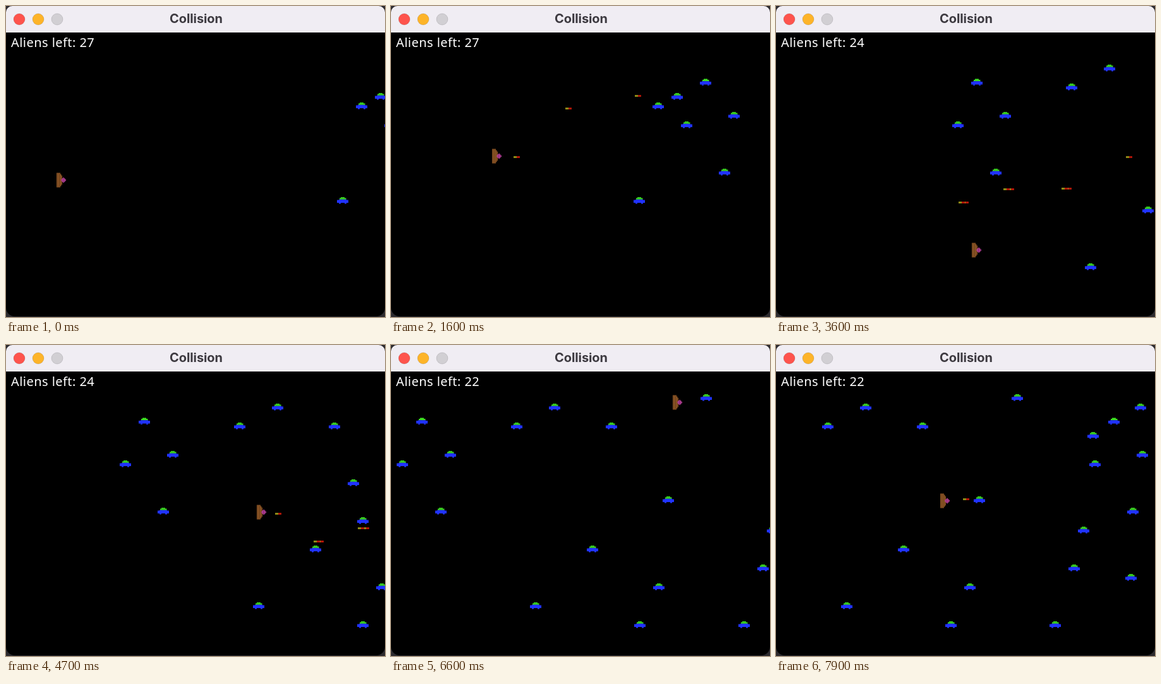
An HTML page with a canvas for the animation above (8 s loop, 600 by 493 pixels).

```html
<!DOCTYPE html>
<html lang="en">
<head>
<meta charset="utf-8">
<title>Collision</title>
<style>
html, body { margin: 0; width: 100%; height: 100%; overflow: hidden; background: #2c2a2e; }
canvas { display: block; }
</style>
</head>
<body>
<canvas id="stage" width="600" height="493"></canvas>
<script>
const LOOP = 8000, STEP = 100, WIDTH = 600, WRAP = 603, PIXEL = 1.5;
const ctx = document.getElementById('stage').getContext('2d');

// Distance the aliens have flown, after a slightly slow start.
const scrollAt = t => 0.0899 * t - Math.min(4, t / 400);

// Course of the ship: [ms, left, middle]
const COURSE = [
  [0, 80, 276], [200, 126, 142], [900, 139, 162], [1500, 162, 239], [1600, 160, 238],
  [2000, 200, 309], [2400, 227, 289], [3000, 244, 290], [3440, 244, 311], [3600, 310, 387],
  [4600, 393, 267], [4700, 397, 265], [4800, 408, 279], [5100, 415, 219], [5500, 413, 221],
  [5900, 418, 197], [6600, 446, 91], [7900, 260, 247]
];
const FIRE_TIMES = [200, 900, 1500, 2000, 2400, 2433, 3000, 3040, 3400, 3433,
  4600, 4800, 5100, 5500, 7800];

// Aliens sit on a coarse grid: [column, row]
const aliens = [
  [35, 15], [37, 5], [39, 4], [40, 7], [42, 2.5], [44, 12], [45, 6], [52, 3],
  [54, 22], [56, 1], [60, 16], [62, 3], [64, 9], [65, 13], [65, 24], [67, 20],
  [68, 10.8], [72, 0], [76, 24], [78, 18], [79, 14], [80, 4], [84, 19], [85, 1]
].map(([col, row]) => ({ x: 7 + 15.02 * col, y: 83 + 15 * row, hit: Infinity }));

function shipAt(t) {
  const i = COURSE.findIndex(k => k[0] > t);
  if (i < 0) return COURSE[COURSE.length - 1].slice(1);
  const [t0, x0, y0] = COURSE[i - 1], [t1, x1, y1] = COURSE[i];
  const p = (t - t0) / (t1 - t0), ease = p * p * (3 - 2 * p);
  return [x0 + (x1 - x0) * ease, y0 + (y1 - y0) * ease];
}

// A shot flies right at twice the alien speed and takes the first alien in its way.
const shots = FIRE_TIMES.map(fired => {
  const [left, y] = shipAt(fired), from = scrollAt(fired);
  const shot = { x: left + 15 - 2 * from, y, fired, hit: Infinity };
  const meet = a => (a.x - 19 - shot.x) / 3;
  const victim = aliens.find(a => a.hit === Infinity && Math.abs(a.y - y) < 8 &&
    meet(a) > from && a.x - meet(a) < WIDTH);
  if (victim) victim.hit = shot.hit = meet(victim);
  return shot;
});

function rect(color, x, y, w, h) {
  ctx.fillStyle = color;
  ctx.fillRect(x, y, w, h);
}

function text(str, x, y, font, color, align, spacing) {
  ctx.font = font;
  ctx.fillStyle = color;
  ctx.textAlign = align;
  ctx.letterSpacing = spacing;
  ctx.fillText(str, x, y);
}

function drawAlien(x, y) {
  x = Math.round(x);
  const green = '#3ee322', blue = '#2033ff';
  const bar = (color, dx, row, w, rows = 1) =>
    rect(color, x + dx, y - 5 + row * PIXEL, w, rows * PIXEL);
  bar(green, -3, 0, 6);
  bar(green, -5, 1, 10.5, 1.5);
  bar(blue, -6, 2.5, 12);
  bar(blue, -9, 3, 18, 3);
  bar(blue, -6, 6, 3);
  bar(blue, 3, 6, 3);
}

function drawShip(x, y) {
  x = Math.round(x);
  for (let dx = 0; dx < 15; dx += PIXEL) {
    const body = dx < 9 ? 23 - 2.8 * Math.max(0, dx - 4.5) : 0;
    const nose = dx > 7 ? 9 - 2 * Math.abs(dx - 10.25) : 0;
    rect('#8b5424', x + dx, y - body / 2, PIXEL, body);
    if (nose > 0) rect('#b03c94', x + dx, y - nose / 2, PIXEL, nose);
  }
}

function drawShot(x, y) {
  x = Math.round(x);
  y = Math.round(y);
  rect('#b01508', x, y - 1, 10, 3);
  rect('#8d8a16', x, y - 1, 5, 3);
}

function drawWindow() {
  rect('#2c2a2e', 0, 0, WIDTH, 493);
  ctx.beginPath();
  ctx.roundRect(0, 0, WIDTH, 492, [10, 10, 14, 14]);
  ctx.clip();
  rect('#000', 0, 42, WIDTH, 451);
  rect('#f0edf3', 0, 0, WIDTH, 42);
  ['#fe544d', '#fdb429', '#d1cfd3'].forEach((color, i) => {
    ctx.fillStyle = color;
    ctx.strokeStyle = 'rgba(0, 0, 0, 0.12)';
    ctx.beginPath();
    ctx.arc(21 + i * 30, 21, 9, 0, Math.PI * 2);
    ctx.fill();
    ctx.stroke();
  });
  text('Collision', 301, 27, '700 20px Inter, sans-serif', '#3d3a40', 'center', '-0.1px');
}

function draw(now) {
  const t = Math.floor(now % LOOP / STEP) * STEP, scroll = scrollAt(t);
  const alive = aliens.filter(a => scroll < a.hit);

  ctx.save();
  drawWindow();
  for (const a of alive) {
    const x = a.x - scroll;
    drawAlien(x < 0 ? x + WRAP : x, a.y);
  }
  for (const s of shots) {
    if (t >= s.fired && scroll < s.hit) drawShot(s.x + 2 * scroll, s.y);
  }
  drawShip(...shipAt(t));
  text('Aliens left: ' + (alive.length + 3), 8, 65,
    '20px "Noto Sans", "Open Sans", sans-serif', '#fff', 'left', '0.45px');
  ctx.restore();
}

function loop() {
  draw(performance.now());
  requestAnimationFrame(loop);
}
loop();
</script>
</body>
</html>
```
